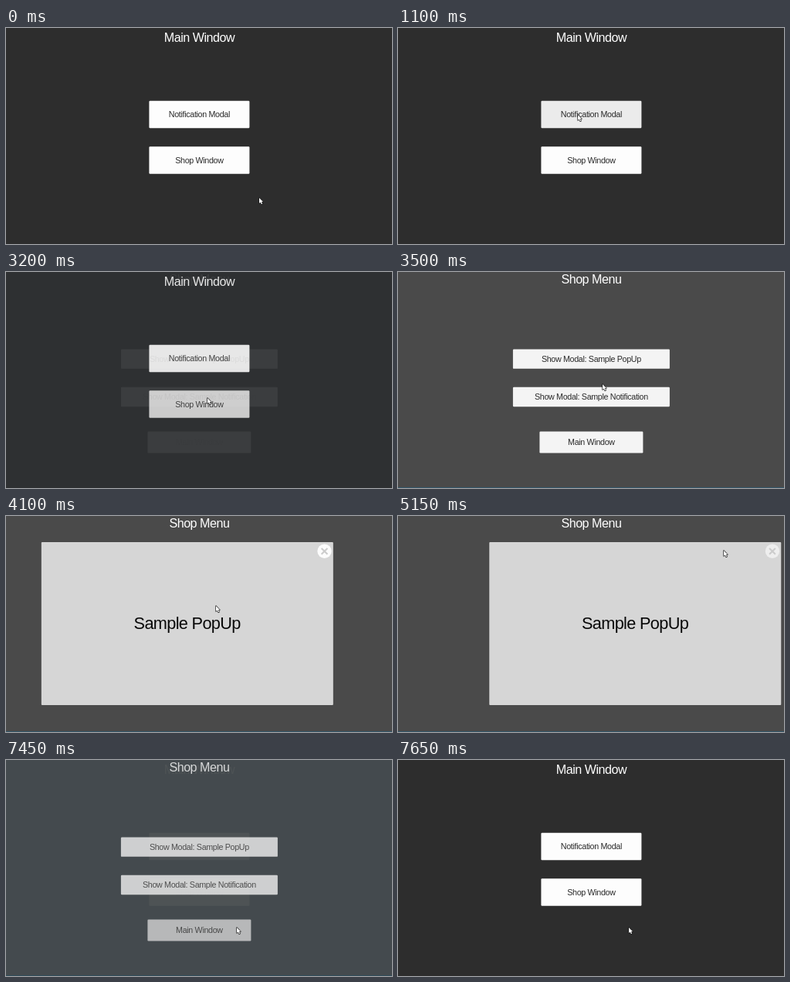
Write an HTML page with a canvas that moves like this. It is 500 by 281 pixels and loops after 8.55 s.

```html
<!DOCTYPE html>
<html lang="en">
<head>
<meta charset="utf-8">
<title>Window transitions</title>
<style>
  html, body { margin: 0; width: 100%; height: 100%; overflow: hidden; background: #2d2d2d; }
  canvas { display: block; width: 500px; height: 281px; }
</style>
</head>
<body>
<canvas id="stage" width="500" height="281"></canvas>
<script>
const ctx = document.getElementById('stage').getContext('2d');
const LOOP = 8550, STEP = 50, CENTER = 250.4;
const FADE = 500, TRAVEL = 400;

// Moments at which the pointer clicks something
const click = {
  notify: 1100, closeNotify: 2250, shop: 3000, popup: 3765,
  closePopup: 5050, notifyAgain: 5800, closeAgain: 6650, main: 7150
};

// Pointer stops; every trip takes TRAVEL ms
const stops = [
  { leave: 0, x: 328, y: 221 },
  { leave: 630, x: 233, y: 113 },
  { leave: 1270, x: 459, y: 25 },
  { leave: 1900, x: 490, y: 12 },
  { leave: 2480, x: 261, y: 164 },
  { leave: 3330, x: 272, y: 117 },
  { leave: 4450, x: 422, y: 45 },
  { leave: 5280, x: 330, y: 171 },
  { leave: 6000, x: 491, y: 13 },
  { leave: 6700, x: 299, y: 218 }
];

const progress = (t, start, length) => Math.max(0, Math.min(1, (t - start) / length));
const easeIn = p => p ** 3;
const easeOut = p => 1 - (1 - p) ** 3;
const smooth = p => p * p * (3 - 2 * p);
const between = (t, a, b) => t >= a && t < b;
const gray = v => `rgb(${v},${v},${v})`;

function pointerAt(t) {
  return stops.reduce((from, to) => {
    const p = smooth(progress(t, to.leave, TRAVEL));
    return { x: from.x + (to.x - from.x) * p, y: from.y + (to.y - from.y) * p };
  });
}

function box(x, y, w, h, color, radius = 0) {
  ctx.fillStyle = color;
  ctx.beginPath();
  ctx.roundRect(x, y, w, h, radius);
  ctx.fill();
}

function label(text, x, y, size, color) {
  ctx.font = `${size}px "Liberation Sans", Arial, sans-serif`;
  ctx.letterSpacing = `${-0.03 * size}px`;
  ctx.textAlign = 'center';
  ctx.fillStyle = color;
  ctx.fillText(text, x, y);
}

function button(text, middle, w, h, shade, tint = 1) {
  box(CENTER - w / 2, middle - h / 2, w, h, gray(Math.round(shade * tint)), 1.2);
  label(text, CENTER, middle + 3.8, 10.7, '#292929');
}

function closeIcon(x, y, face, cross) {
  const arm = 3.9;
  ctx.fillStyle = gray(face);
  ctx.beginPath();
  ctx.arc(x, y, 9.2, 0, Math.PI * 2);
  ctx.fill();
  ctx.strokeStyle = gray(cross);
  ctx.lineWidth = 2.1;
  ctx.beginPath();
  for (const side of [-1, 1]) {
    ctx.moveTo(x - arm * side, y - arm);
    ctx.lineTo(x + arm * side, y + arm);
  }
  ctx.stroke();
}

// A button stays tinted from hovering until something else is clicked
const selected = (t, from, to, tint = 0.93) => between(t, from - 100, to) ? tint : 1;

function drawMain(t, alpha) {
  ctx.globalAlpha = alpha;
  box(0, 0, 500, 281, '#2d2d2d');
  button('Notification Modal', 112.5, 130, 35.5, 253, selected(t, click.notify, click.closeNotify));
  button('Shop Window', 172, 130, 35.5, 253, selected(t, click.shop, click.popup, 0.88));
  label('Main Window', CENTER, 18.2, 16.1, '#fff');
}

function drawShop(t, alpha) {
  ctx.globalAlpha = alpha;
  box(0, 0, 500, 280, '#4a4a4a');
  button('Show Modal: Sample PopUp', 113.2, 203, 25.3, 244, selected(t, click.popup, click.closePopup));
  button('Show Modal: Sample Notification', 162.5, 203, 25.3, 244, selected(t, click.notifyAgain, click.closeAgain));
  button('Main Window', 221.5, 134, 28, 244, selected(t, click.main, LOOP, 0.88));
  label('Shop Menu', CENTER, 15.2, 16.1, '#fff');
}

function drawPopup(t) {
  if (!between(t, click.popup, click.closePopup + 200)) return;
  const enter = easeOut(progress(t, click.popup, FADE));
  const leave = easeIn(progress(t, click.closePopup, 200));
  const x = 62 + 450 * (enter - 1 + leave);
  const idle = between(t, click.popup + FADE, click.closePopup);
  box(x, 34, 378, 212, '#d6d6d6', 1);
  label('Sample PopUp', x + 188.8, 147.4, 21.7, '#080808');
  closeIcon(x + 366.7, 45.8, leave ? 238 : 252, idle ? 45 : 204);
}

function drawNotification(t, opened, closed) {
  if (!between(t, opened, closed + 150)) return;
  const enter = easeOut(progress(t, opened, 100));
  const leave = easeIn(progress(t, closed, 150));
  const y = 28 * (enter - 1 - leave);
  box(0, y, 500, 28.3, '#272727');
  label('Notification', CENTER, y + 17.8, 10.8, '#f8f8f8');
  closeIcon(490, y + 11, t > closed - 250 ? 244 : 253, 38);
}

function drawPointer(t) {
  const { x, y } = pointerAt(t);
  ctx.save();
  ctx.translate(Math.round(x), Math.round(y));
  const arrow = new Path2D('M0 0V7L1.7 5.7L2.9 8.3L4.1 7.8L3 5.2L5 5.1Z');
  ctx.lineWidth = 1.3;
  ctx.lineJoin = 'round';
  ctx.strokeStyle = '#151515';
  ctx.stroke(arrow);
  ctx.fillStyle = '#fff';
  ctx.fill(arrow);
  ctx.restore();
}

function render(now) {
  const t = Math.floor((now % LOOP) / STEP) * STEP;
  const toShop = easeIn(progress(t, click.shop, FADE));
  const toMain = easeIn(progress(t, click.main, FADE));
  const shopAlpha = toShop - toMain;
  box(0, 0, 500, 281, '#315569');
  drawMain(t, 1 - shopAlpha);
  drawShop(t, shopAlpha);
  ctx.globalAlpha = 1;
  drawPopup(t);
  drawNotification(t, click.notify + 5, click.closeNotify);
  drawNotification(t, click.notifyAgain, click.closeAgain);
  drawPointer(t);
}

const begin = performance.now();
function tick() {
  render(performance.now() - begin);
  requestAnimationFrame(tick);
}
tick();
</script>
</body>
</html>
```
